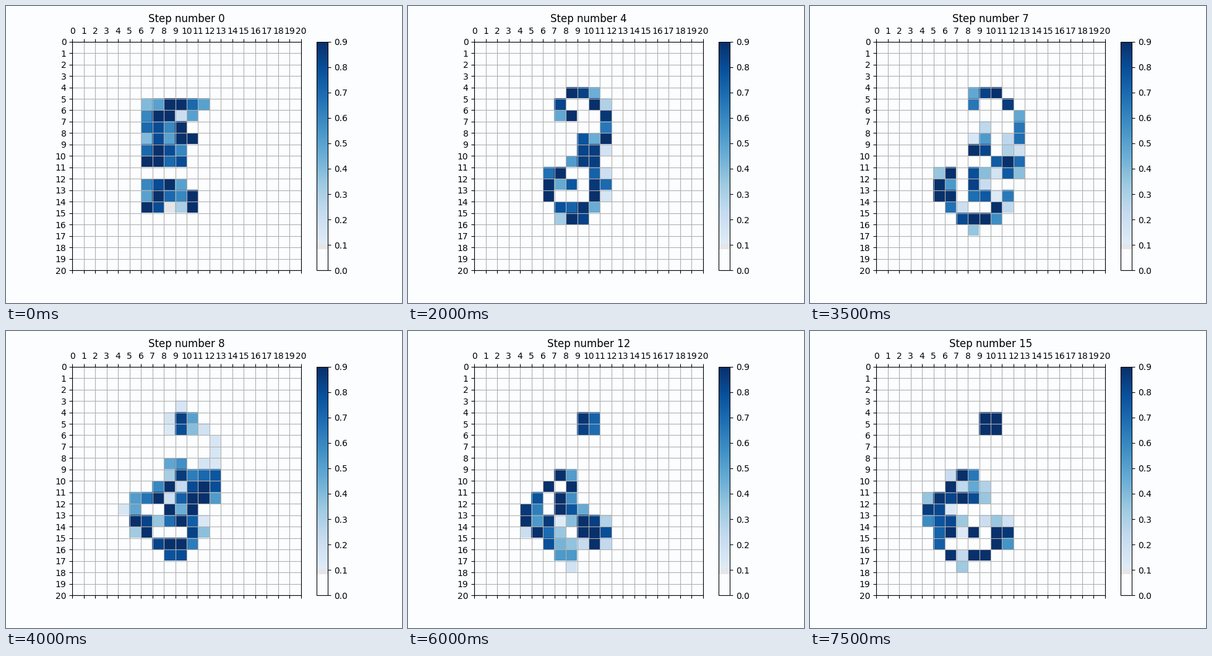
These frames come from a looping animation (640 px wide and 480 px high, 8 s). A matplotlib script:

```python
import numpy as np
import matplotlib.pyplot as plt
from matplotlib.animation import FuncAnimation
from matplotlib.colors import ListedColormap, to_rgba

SIZE, STEPS = 20, 16
TOP, LEFT, VMAX = 5, 6, .9
PAGE, FAINT = "#fcfdff", "#e5e6ea"

# Seed pattern: liveness in tenths, row by row from (TOP, LEFT)
SEED = [(4, 5, 9, 9, 7, 5), (6, 9, 9, 2, 5), (7, 8, 6, 9), (4, 8, 5, 9, 9),
        (7, 9, 8, 6), (9, 9, 7, 8), (), (6, 8, 9, 5), (5, 9, 7, 6, 9),
        (9, 8, 1, 3, 9)]


def first_state():
    a = np.zeros((SIZE, SIZE))
    for row, tenths in enumerate(SEED, TOP):
        a[row, LEFT:LEFT + len(tenths)] = np.array(tenths) / 10
    return a


def advance(a):
    """One step of the semi-quantum Game of Life."""
    p = np.pad(a, 1)
    n = sum(p[i:i + SIZE, j:j + SIZE]
            for i in range(3) for j in range(3) if (i, j) != (1, 1))
    n = n.round(9)

    def mix(w, old, new):
        v = (np.sqrt(2) + 1) * (1 - w)
        return (v * old + w * new) / (v + w)

    dead, alive = 0 * a, 0 * a + 1
    return np.select(
        [n <= 1, n <= 2, n <= 3, n < 4],
        [dead, mix(n - 1, dead, a), mix(n - 2, a, alive), mix(n - 3, alive, dead)],
        0)


def soft_blues():
    """Blues whose palest end fades into the page."""
    level = np.linspace(0, 1, 256)
    colors = plt.get_cmap("Blues")(level)
    colors[level < .105 / VMAX] = to_rgba(FAINT)
    colors[level < .083 / VMAX] = to_rgba(PAGE)
    return ListedColormap(colors)


states = [first_state()]
while len(states) < STEPS:
    states.append(advance(states[-1]))

fig, ax = plt.subplots(figsize=(6.4, 4.8), dpi=100, facecolor=PAGE)
image = ax.matshow(states[0], cmap=soft_blues(), vmin=0, vmax=VMAX,
                   extent=(0, SIZE, SIZE, 0), interpolation="nearest")
fig.colorbar(image, ax=ax)
ax.set_xticks(range(SIZE + 1))
ax.set_yticks(range(SIZE + 1))
ax.grid(True, color="#b0b0b0", linewidth=.8)
title = ax.set_title("Step number 0")


def update(step):
    image.set_data(states[step])
    title.set_text(f"Step number {step}")
    return image, title


anim = FuncAnimation(fig, update, frames=STEPS, interval=500, repeat=True, repeat_delay=0)
plt.show()
```
